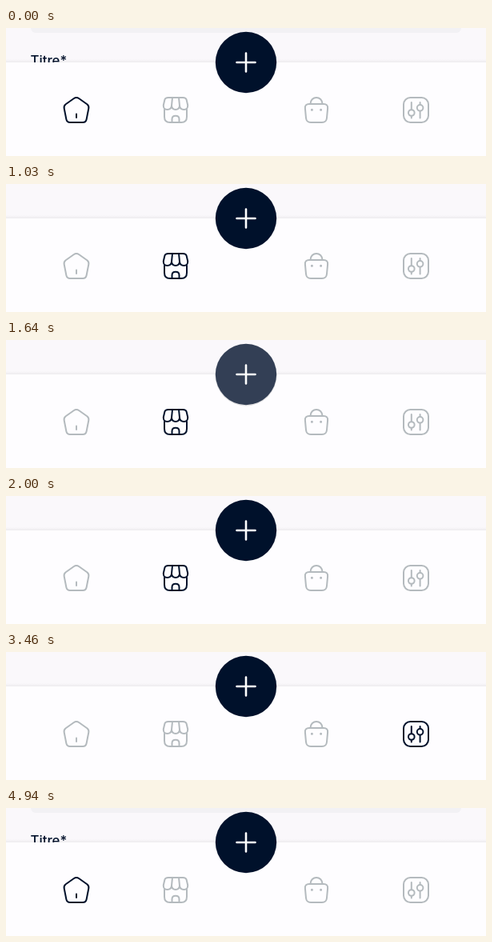
Recreate the animation shown at these times as an HTML page. Size 600 by 160 pixels, loop 5.88 s.

```html
<!DOCTYPE html>
<html lang="fr">
<head>
<meta charset="utf-8">
<title>Tab bar</title>
<style>
  html, body { margin: 0; width: 100%; height: 100%; overflow: hidden; background: #faf8fb; }
  svg { display: block; width: 100vw; height: 100vh; }
  .tab { fill: none; stroke: #b4babe; stroke-width: 2; stroke-linecap: round; stroke-linejoin: round; }
  .tab.on { stroke: #00112b; }
  .label { font: 500 16.8px Inter, sans-serif; fill: #00112b; }
</style>
</head>
<body>
<svg viewBox="0 0 600 160">
  <defs>
    <linearGradient id="edge" x1="0" y1="0" x2="0" y2="1">
      <stop offset="0" stop-color="#000" stop-opacity="0"/>
      <stop offset="1" stop-color="#000" stop-opacity=".05"/>
    </linearGradient>
  </defs>
  <rect width="600" height="160" fill="#faf8fb"/>
  <g id="form">
    <rect x="31" y="-20" width="538" height="26" rx="6" fill="#f2f1f4"/>
    <text class="label" x="30.5" y="47">Titre*</text>
  </g>
  <rect y="39" width="600" height="4" fill="url(#edge)"/>
  <rect y="43" width="600" height="117" fill="#fefdff"/>
  <circle id="ripple" cy="102" r="52"/>

  <g class="tab">
    <path d="M84.6 88.2Q88 85.8 91.4 88.2L101.3 95.2Q104 97.3 103.3 100.5L100.6 114.3Q99.8 118 96 118H80Q76.2 118 75.4 114.3L72.7 100.5Q72 97.3 74.7 95.2Z"/>
    <path d="M88 107.5V112"/>
  </g>
  <g class="tab">
    <path d="M203 87H221Q225 87 225.7 90L227.2 96.5Q227.4 102 222.4 102Q217.5 102 217 97L216 87M208 87L207 97Q206.5 102 201.6 102Q196.6 102 196.8 96.5L198.3 90Q199 87 203 87M207 97Q207.5 102 212 102Q216.5 102 217 97"/>
    <path d="M198 102V111Q198 118 205 118H219Q226 118 226 111V102M207.5 118V114Q207.5 109.7 212 109.7Q216.5 109.7 216.5 114V118"/>
  </g>
  <g class="tab">
    <path d="M379 95H397Q402.6 95 402.1 100.5L401 112.5Q400.5 118 395 118H381Q375.5 118 375 112.5L373.9 100.5Q373.4 95 379 95ZM380.5 95C380.5 84.2 395.5 84.2 395.5 95"/>
    <path d="M382.4 102.3h.01M393.6 102.3h.01" stroke-width="3"/>
  </g>
  <g class="tab">
    <rect x="497" y="87" width="31" height="31" rx="8.5"/>
    <circle cx="506.8" cy="106" r="3.8"/>
    <circle cx="517.6" cy="99.8" r="3.8"/>
    <path d="M506.8 93V102M506.8 110V112.5M517.6 93V96M517.6 104V112.5"/>
  </g>

  <circle id="shade" cx="300" cy="44" r="38.5" fill="#000" opacity="0"/>
  <circle cx="300" cy="43" r="38.2" fill="#fefdff"/>
  <circle id="fab" cx="300" cy="43" r="38.2" fill="#00112b"/>
  <path d="M288.5 43H311.5M300 31.5V54.5" stroke="#fff" stroke-width="2.6" stroke-linecap="round"/>
</svg>
<script>
  const LOOP = 5880;
  const $ = id => document.getElementById(id);
  const form = $('form'), ripple = $('ripple'), fab = $('fab'), shade = $('shade');
  const tabs = [...document.querySelectorAll('.tab')];

  const switches = [[0, 0], [730, 1], [2640, 2], [3220, 3], [4760, 0]];
  const ripples = [
    { x: 388, start: 2640, hold: 30, end: 2790, peak: 0.07 },
    { x: 512, start: 3220, hold: 30, end: 3460, peak: 0.035 }
  ];
  const press = { start: 1550, hold: 60, end: 1760, peak: 0.25 };

  // Appears at once, holds, then fades away.
  function pulse(t, { start, hold, end, peak }) {
    if (t < start || t >= end) return 0;
    const k = Math.max(0, (t - start - hold) / (end - start - hold));
    return peak * (1 - k);
  }

  function draw(t) {
    const active = switches.filter(([at]) => t >= at).pop()[1];
    tabs.forEach((tab, i) => tab.classList.toggle('on', i === active));
    form.style.display = active === 0 ? '' : 'none';

    const tap = ripples.find(r => t >= r.start && t < r.end);
    ripple.setAttribute('cx', tap ? tap.x : 0);
    ripple.setAttribute('opacity', tap ? pulse(t, tap) : 0);

    const fade = pulse(t, press);
    fab.setAttribute('opacity', 1 - fade);
    shade.setAttribute('opacity', fade * 0.6);
  }

  const begin = performance.now();
  function frame() {
    draw((performance.now() - begin) % LOOP);
    requestAnimationFrame(frame);
  }
  frame();
</script>
</body>
</html>
```
